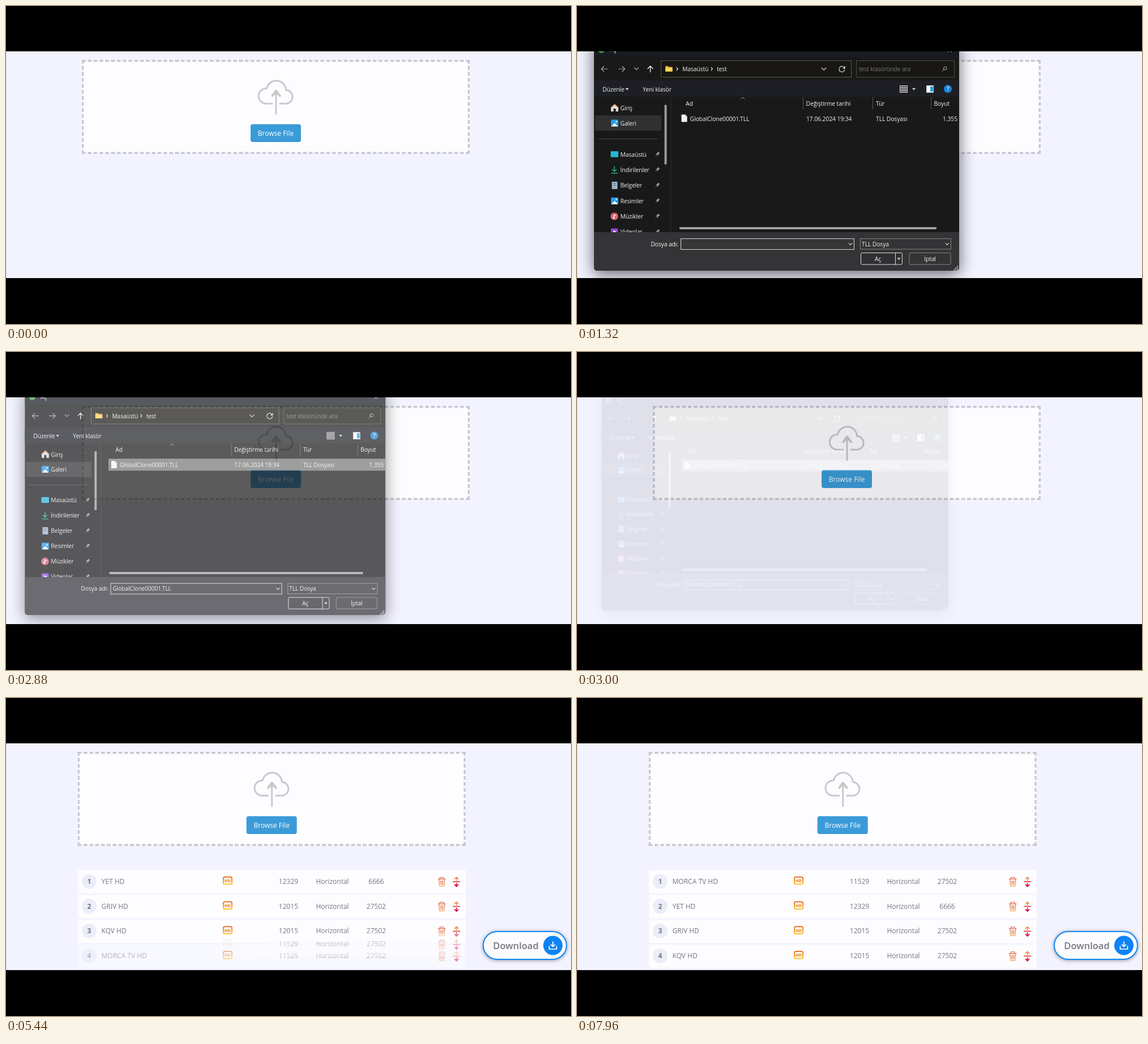
Write an HTML page that moves like this. It is 998 by 561 pixels and loops after 8000 ms.

```html
<!DOCTYPE html>
<html lang="tr">
<head>
<meta charset="utf-8">
<title>Upload and sort</title>
<style>
html, body { margin: 0; width: 100%; height: 100%; overflow: hidden; background: #000; }
svg { display: block; }
text { white-space: pre; }
#page, .row { font: 12px "Open Sans", "Noto Sans", sans-serif; font-stretch: condensed; fill: #77757f; }
#dialog { font: 10.4px "Open Sans", "Noto Sans", sans-serif; letter-spacing: -.12px; fill: #f0f0f0; }
.mid { text-anchor: middle; }
.line { fill: none; stroke-linecap: round; stroke-linejoin: round; }
</style>
</head>
<body>
<svg width="998" height="561" viewBox="0 0 998 561">
  <defs>
    <linearGradient id="gold" x2="0" y2="1"><stop stop-color="#f0702c"/><stop offset="1" stop-color="#fcc52a"/></linearGradient>
    <linearGradient id="rust" x2="0" y2="1"><stop stop-color="#dd5a4c"/><stop offset="1" stop-color="#f0a45c"/></linearGradient>
    <linearGradient id="fade"><stop offset=".34" stop-color="#000"/><stop offset=".55" stop-color="#fff"/></linearGradient>
    <mask id="ghostMask" maskUnits="userSpaceOnUse" x="127" y="-25" width="686" height="50"><path d="M127-25h686v50h-686z" fill="url(#fade)"/></mask>
    <clipPath id="sideClip"><path d="M30 160h134v239H30z"/></clipPath>
  </defs>
  <svg y="80" width="998" height="400" viewBox="0 80 998 400">
    <path d="M0 80h998v400H0z" fill="#f3f3ff"/>
    <path d="M.5 80v400" stroke="#dadae6"/>
    <g id="page"></g>
    <g id="list"></g>
    <g id="dialog"></g>
  </svg>
</svg>
<script>
const $ = id => document.getElementById(id);
const clamp = v => Math.max(0, Math.min(1, v));
const easeOut = p => 1 - (1 - clamp(p)) ** 2;
const text = (x, y, s, attrs = '') => `<text x="${x}" y="${y}" ${attrs}>${s}</text>`;
const box = (x, y, w, h, attrs, r = 0) => `<rect x="${x}" y="${y}" width="${w}" height="${h}" rx="${r}" ${attrs}/>`;
const line = (d, color, w = 1) => `<path class="line" d="${d}" stroke="${color}" stroke-width="${w}"/>`;
const fill = (d, color) => `<path d="${d}" fill="${color}"/>`;
const dot = (x, y, r, color) => `<circle cx="${x}" cy="${y}" r="${r}" fill="${color}"/>`;
const show = (id, on) => $(id).setAttribute('opacity', +on);
const move = (id, x, y) => $(id).setAttribute('transform', `translate(${x} ${y})`);

// Upload area
const dashes = (d, gap) => `<path d="${d}" stroke="#c8c8d2" stroke-width="3.4" stroke-dasharray="6.8 ${gap}"/>`;
$('page').innerHTML =
  box(134, 95, 685, 166, 'fill="#fdfdff"') +
  dashes('M134 96.7h685M134 259.3h685', 3.476) +
  dashes('M135.7 95v166M817.3 95v166', 3.813) +
  line('M470 172.3H459A13.4 13.4 0 1 1 460.5 145.4A17.2 17.2 0 0 1 494.5 148.2A12.1 12.1 0 0 1 495.5 172.3H484', '#c8c8d2', 3) +
  line('M477 152v38.5', '#c8c8d2', 3) +
  line('M470.5 158.5l6.5-9 7 9M477 150v6', '#c8c8c8', 4) +
  box(432, 208.5, 89, 31.5, 'fill="#3b9bd8"', 4) +
  text(476.5, 229, 'Browse File', 'class="mid" fill="#fff" font-weight="500"');

// Channel list
const PITCH = 43.75, TOP = 323.8;
const channels = [
  ['YET HD', 12329, 6666], ['GRIV HD', 12015, 27502],
  ['KQV HD', 12015, 27502], ['MORCA TV HD', 11529, 27502]
];
const rowArt = ([name, freq, rate], id) =>
  box(127, -20, 685, 41, 'fill="#fdfdff"') +
  dot(147, -.3, 13, '#ebedf9') +
  text(147, 4, '', `id="${id}" class="mid" font-weight="bold"`) +
  text(168.5, 4, name) +
  box(384, -8, 15, 12.6, 'fill="none" stroke="url(#gold)" stroke-width="2"', 2.5) +
  text(391.4, 1.2, 'HD', 'class="mid" fill="#f28c22" font-size="7.5" font-weight="800" font-stretch="normal"') +
  text(499, 4, freq, 'class="mid"') + text(576.5, 4, 'Horizontal', 'class="mid"') + text(654, 4, rate, 'class="mid"') +
  line('M763.5-4.5h12.5M766.5-5v-2.3h6.5v2.3M764.7-4l1 12h8.2l1-12M767.5-1.5l.3 7M769.8-1.5v7M772-1.5l-.3 7', 'url(#rust)', 1.2) +
  line('M795.7-2v-5m-3 2.3l3-3 3 3', '#f58a4e', 1.6) +
  line('M790 .3h11.5', '#ec5a50', 2) +
  line('M795.7 3v5m-3-2.3l3 3 3-3', '#d80f55', 1.8);
$('list').innerHTML =
  channels.map((c, i) => `<g class="row" id="row${i}">${rowArt(c, 'num' + i)}</g>`).join('') +
  `<g class="row" id="ghost"><g mask="url(#ghostMask)">${rowArt(channels[3], 'numGhost')}</g></g>` +
  `<g class="row">` +
  box(843, 412, 147, 49, 'fill="#fcfcff" stroke="#1088f2" stroke-width="2" style="filter:drop-shadow(0 1px 3px #0006)"', 24.5) +
  text(900.5, 442.5, 'Download', 'class="mid" font-size="16.5" font-weight="600"') +
  dot(966, 436.5, 17, '#0d83f5') +
  line('M966 430v8.5m-3.5-3.3l3.5 3.5 3.5-3.5M959.5 438v5h13v-5', '#fff', 1.7) + `</g>`;

// File dialog
const chevron = (x, y, s = 3.5, c = '#ddd') => line(`M${x - s} ${y - s / 2}l${s} ${s} ${s}-${s}`, c, 1.1);
const drop = (x, y) => fill(`M${x - 3} ${y - 1.5}h6l-3 3.5z`, '#ddd');
const picture = y => box(60, y - 6, 13, 12, 'fill="#2a9be8"', 1.5) + fill(`M60.5 ${y + 6}l6-6 6 6z`, '#fff') + dot(69.5, y - 2.5, 1.3, '#fff');
const pin = y => line(`M139 ${y + 3}l2.5-2.5`, '#999') + fill(`M139.5 ${y - 1.5}l3.5 4 .8-2.6 2.5-2-2.7-2.7-1.8 2.5z`, '#999');
const places = [
  ['Masaüstü', y => box(59.5, y - 5.5, 13.5, 10.5, 'fill="#29b5d8"', 1)],
  ['İndirilenler', y => line(`M66 ${y - 6}v9m-3.5-3.5l3.5 3.5 3.5-3.5M61 ${y + 6}h10`, '#27b58c', 1.4)],
  ['Belgeler', y => box(61.5, y - 6.5, 10, 13, 'fill="#9db2c9"', 1) + line(`M64 ${y - 3}h5M64 ${y}h5`, '#56708c')],
  ['Resimler', picture],
  ['Müzikler', y => dot(66, y, 6.7, '#db6574') + line(`M65.5 ${y + 2.5}v-5l3 1`, '#fff', 1.2) + dot(64.5, y + 2.5, 1.5, '#fff')],
  ['Videolar', y => box(60, y - 6, 12.5, 12, 'fill="#9645d6"', 1.5) + fill(`M64.5 ${y - 3}l5 3-5 3z`, '#fff')]
];
const sidebar =
  box(32, 193, 117, 27, 'fill="#303030"', 2) +
  fill('M60 180l6.5-6.5 6.5 6.5v6h-4.5v-5h-4v5H60z', '#e5ded8') + line('M60 179.5l6.5-6 6.5 6', '#d98a55', 1.5) +
  text(76.5, 184, 'Giriş') + picture(206.5) + text(76.5, 210.5, 'Galeri') + line('M38 234.5h104', '#454545') +
  places.map(([name, icon], i) => {
    const y = 261.7 + i * 27.35;
    return icon(y) + text(76.5, y + 4, name) + pin(y);
  }).join('');
let grip = '';
for (let i = 0; i < 3; i++) for (let j = 0; j <= i; j++) grip += box(671 - j * 3, 458.5 + i * 3, 2, 2, 'fill="#bbb"');

$('dialog').innerHTML =
  box(30, 62, 645, 405, 'fill="#191919" style="filter:drop-shadow(0 6px 14px #0009)"', 6) +
  fill('M30 80h645v10H30z', '#191b22') + fill('M30 131h645v29H30z', '#1e1f24') +
  fill('M30 399h645v62q0 6-6 6H36q-6 0-6-6z', '#343437') +
  dot(43, 77, 6, '#3fa34d') + text(58, 81, 'Aç') + line('M655 75l6 6m0-6l-6 6', '#ddd') +
  line('M54 111H43.5m4-4.5l-4.5 4.5 4.5 4.5', '#aaa', 1.2) + line('M73.5 111H84m-4-4.5l4.5 4.5-4.5 4.5', '#aaa', 1.2) +
  chevron(105, 110.5, 3.5, '#aaa') + line('M129.5 116.5V106m-4.5 4.5l4.5-4.5 4.5 4.5', '#f0f0f0', 1.3) +
  box(148.5, 96.5, 336, 29, 'fill="#181713" stroke="#5a5a55"') + box(493.5, 96.5, 173, 29, 'fill="#181713" stroke="#4c4c48"') +
  fill('M156 106h5l1.5 1.5h6v8H156z', '#e6a92e') + fill('M156 109h12.5v6.5H156z', '#ffd257') +
  line('M176 108.5l2.3 2.5-2.3 2.5M237 108.5l2.3 2.5-2.3 2.5', '#ddd', 1.2) +
  text(186, 115, 'Masaüstü') + text(247, 115, 'test') + chevron(436, 111, 4) +
  line('M472.5 109.5a5 5 0 1 0 .3 2.5M473 106.5v3.3h-3.2', '#ddd', 1.2) +
  text(498, 115, 'test klasöründe ara', 'fill="#777"') +
  line('M645 115l3-3M647.5 110a2.8 2.8 0 1 0 5.6 0a2.8 2.8 0 1 0-5.6 0', '#bbb') +
  '<g id="tools">' + text(45, 150.5, 'Düzenle') + drop(88.5, 146.5) + text(116, 150.5, 'Yeni klasör') +
  box(570.5, 140.5, 13, 12, 'fill="#555" stroke="#ccc"') + line('M572 143.5h10M572 146.5h10M572 149.5h10', '#ddd') + drop(595, 146.5) + '</g>' +
  box(617.5, 140.5, 12, 12, 'fill="#fff" stroke="#ccc"') + box(624, 142, 5, 9, 'fill="#2a9be8"') +
  dot(655, 146.3, 7, '#1683d8') + text(655, 150, '?', 'class="mid" font-weight="600"') +
  line('M399.5 161v21M522.5 161v21M625.5 161v21', '#55554f') + line('M290 164l3-3 3 3', '#999') +
  text(192, 175.5, 'Ad') + text(404.5, 175.5, 'Değiştirme tarihi') + text(528, 175.5, 'Tür') + text(630.5, 175.5, 'Boyut') +
  box(179.5, 187.5, 495.5, 21.5, 'id="mark" fill="#555"') +
  fill('M184.5 191.5h7l3 3v10h-10z', '#f4f4f4') + line('M191.5 191.5v3h3', '#999') +
  text(199.5, 202.5, 'GlobalClone00001.TLL') + text(405, 202.5, '17.06.2024 19:34') +
  text(528, 202.5, 'TLL Dosyası') + text(672, 202.5, '1.355', 'text-anchor="end"') +
  `<g clip-path="url(#sideClip)">${sidebar}</g>` +
  line('M166 160v239', '#2e2e2e') + box(154.5, 174.5, 4, 105, 'fill="#9b9b9b"', 1) +
  box(181, 390, 454, 4, 'fill="#a0a0a0"', 1) +
  text(179, 423.5, 'Dosya adı:', 'text-anchor="end"') +
  box(183.5, 410.5, 306, 19, 'fill="#363637" stroke="#d8d8d8"') + chevron(483, 420, 2.8) +
  '<path id="caret" d="M185.5 413v14" stroke="#eee"/>' + text(187, 423.5, 'GlobalClone00001.TLL', 'id="fileName"') +
  box(500.5, 410.5, 160, 18.5, 'fill="#343436" stroke="#858585"') + text(503, 423.5, 'TLL Dosya') + chevron(654, 420, 2.8) +
  box(501.5, 435.5, 73, 20.5, 'fill="#303032" stroke="#e0e0e0"', 2) + line('M562.5 436v20', '#e0e0e0') + drop(568.5, 446) +
  text(531.5, 449.5, 'Aç', 'class="mid"') +
  box(587, 435.5, 73, 20.5, 'fill="#343436" stroke="#858585"', 2) + text(623.5, 449.5, 'İptal', 'class="mid"') + grip;

// Each drag lifts the last channel by one place: start, swap, drop, sideways drift
const drags = [[5360, 5520, 6040, 20], [6320, 6480, 6840, 48], [7440, 7600, 7960, 11]];

function drawDialog(t) {
  const opening = easeOut((t - 680) / 240), closing = clamp((t - 2840) / 200);
  const scale = .9 + .1 * opening - .0625 * closing;
  const on = t >= 680 && t < 3040;
  show('dialog', on ? clamp((t - 640) / 120) * (1 - closing) ** 1.5 : 0);
  $('dialog').setAttribute('transform', `translate(298 238) scale(${scale}) translate(-298 -238)`);
  show('tools', t >= 960);
  show('caret', t < 1320 || t >= 1880 && t < 2360);
  show('mark', t < 1480 ? 0 : t < 1520 ? .5 : 1);
  $('mark').setAttribute('fill', t < 2600 ? '#555' : '#777');
  show('fileName', t >= 2600);
}

function drawList(t) {
  const loaded = t >= 4000;
  show('list', loaded);
  move('page', loaded ? -7.3 : 0, 0);
  const slides = drags.map(d => easeOut((t - d[1]) / 120));
  const swapped = drags.map(d => t >= d[1]);
  const active = drags.findIndex(d => t >= d[0] && t < d[2]);
  for (let i = 0; i < 3; i++) {
    move('row' + i, 0, TOP + PITCH * (i + slides[2 - i]));
    $('num' + i).textContent = i + 1 + swapped[2 - i];
  }
  move('row3', 0, TOP + PITCH * (3 - slides[0] - slides[1] - slides[2]));
  $('num3').textContent = 4 - swapped.filter(Boolean).length;
  show('row3', active < 0 ? 1 : .5);
  show('ghost', active < 0 ? 0 : .42);
  if (active >= 0) {
    const [start, , , drift] = drags[active];
    const x = drift * easeOut((t - start - 160) / 260);
    move('ghost', x, TOP + PITCH * (3 - active) - 44 * easeOut((t - start) / 300));
  }
}

function frame(now) {
  const t = now % 8000;
  drawDialog(t);
  drawList(t);
  requestAnimationFrame(frame);
}
requestAnimationFrame(frame);
</script>
</body>
</html>
```
